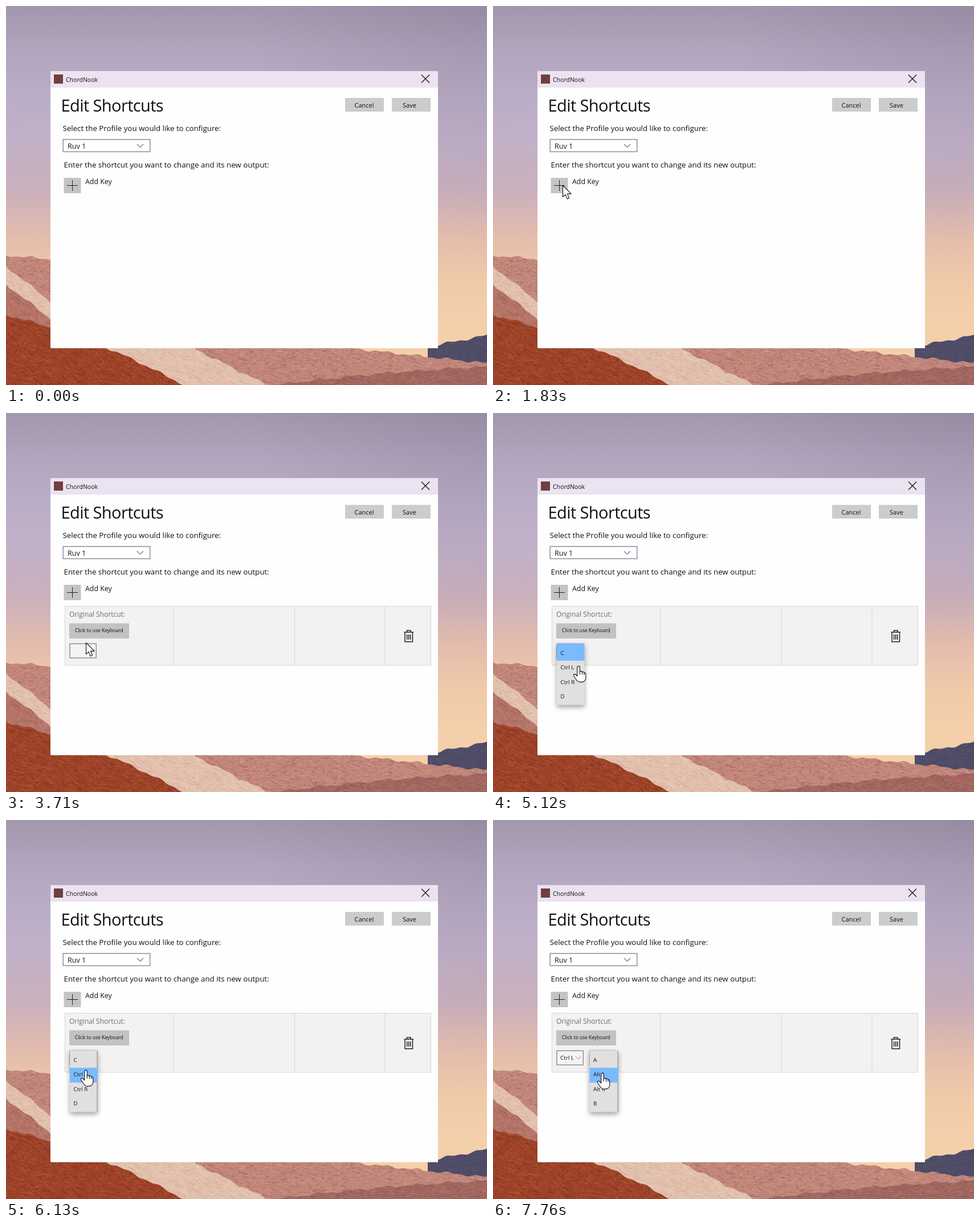
Recreate the animation shown at these times as an HTML page with a canvas. Size 844 px wide and 664 px high, loop 7.99 s.

```html
<!DOCTYPE html>
<html lang="en">
<head>
<meta charset="utf-8">
<title>Edit Shortcuts</title>
<style>
  html, body { margin: 0; width: 100%; height: 100%; overflow: hidden; background: #b8a9bf; }
  canvas, svg { position: absolute; left: 0; top: 0; width: 844px; height: 664px; }
  text { font-family: "Open Sans", "Noto Sans", sans-serif; fill: #111; }
  .h { font-size: 29px; letter-spacing: -.6px; }
  .p { font-size: 13.3px; }
  .b { font-size: 11px; }
  .k { font-size: 9.8px; }
  .line { fill: none; stroke: #222; }
  .box { fill: #f5f3f4; stroke: #8c8c8c; stroke-width: 1.4; }
  .chev { fill: none; stroke: #8a8a8a; }
  .cell { stroke: #d6d5d6; fill: none; }
  .list { filter: drop-shadow(0 4px 4px rgba(0, 0, 0, .36)); }
  .ptr { fill: #fff; stroke: #111; stroke-width: 1.1; stroke-linejoin: round; }
</style>
</head>
<body>
<canvas id="land" width="844" height="664"></canvas>
<svg viewBox="0 0 844 664">
  <rect x="78" y="114" width="680" height="485.500" fill="#fefefe"/>
  <rect x="78" y="114" width="680" height="29" fill="#ebe3f1"/>
  <rect x="84" y="120" width="16" height="16" fill="#70403f"/>
  <text x="105" y="132.500" font-size="10.5">ChordNook</text>
  <path class="line" stroke-width="1.5" d="M729 120.500l14 14m0 -14l-14 14"/>

  <text class="h" x="96.500" y="184.500">Edit Shortcuts</text>
  <path fill="#ccc" d="M595 161h68v24h-68zM677 161h68v24h-68z"/>
  <text class="b" x="611.500" y="177.500">Cancel</text>
  <text class="b" x="696" y="177.500">Save</text>

  <text class="p" x="99.500" y="219">Select the Profile you would like to configure:</text>
  <rect x="100.200" y="233.800" width="152.500" height="21.500" fill="#fff" stroke="#9792a5" stroke-width="1.6"/>
  <text x="108" y="249.500" font-size="12.6">Ruv 1</text>
  <path class="line" d="M230 242l5.500 5.500l5.500 -5.500"/>

  <text class="p" x="101.500" y="283">Enter the shortcut you want to change and its new output:</text>
  <rect x="101.500" y="301" width="30" height="27" fill="#c4c4c4"/>
  <path class="line" d="M107 314.500h19m-9.500 -9.500v19"/>
  <text x="139" y="311.500" font-size="12.4">Add Key</text>

  <g id="row">
    <rect x="103.500" y="338.500" width="642" height="103.500" fill="#f3f1f2"/>
    <path class="cell" d="M103.500 338.500h642v103.500h-642zM294 338.500v103.500M506.500 338.500v103.500M665 338.500v103.500"/>
    <text x="111" y="357" font-size="12" style="fill:#6c6c6c">Original Shortcut:</text>
    <rect x="111" y="368.500" width="105" height="26.500" fill="#c2c2c2"/>
    <text x="121" y="384" font-size="8.5">Click to use Keyboard</text>
    <path class="line" stroke-width="1.5" d="M698.500 384h16.500m-11.500 -.5v-2.500h6.500v2.500M700 384.500v16.200h13.500v-16.200M703.700 388v9m3 0v-9m3 0v9"/>
    <rect class="box" x="112" y="404.300" width="46.300" height="24.800"/>
    <path class="chev" d="M145 414l4.700 4.700l4.700 -4.700"/>
    <text class="k" id="value" x="118" y="419.500">Ctrl L</text>
  </g>
  <g id="second">
    <rect class="box" x="169.700" y="404.300" width="46" height="24.800"/>
    <path class="chev" d="M202 414l4.700 4.700l4.700 -4.700"/>
  </g>
  <g id="ctrl" class="list"></g>
  <g id="alt" class="list"></g>

  <g id="pointer">
    <path id="arrow" class="ptr" d="M.5 .5V20.500L5 16.400L8.300 24L11.600 22.500L8.400 15.100H15.200Z"/>
    <g id="hand" class="ptr">
      <path d="M-2.300 2.500C-2.300 -.4 2.300 -.4 2.300 2.500V10.500C3 8.700 6.500 9 6.500 11.500C7.300 9.600 10 10.200 10 12.600C11 11.300 12.800 12.200 12.800 14.500V20C12.800 25 10 28.400 5.500 28.400H2.500C-.5 28.400 -2 27 -4 24L-8.300 17.700C-9.600 15.200 -7 13.300 -5 15.200L-2.300 18Z"/>
      <path fill="none" d="M2.300 10.500V15M6.500 11.500V15.500M10 12.600V16"/>
    </g>
  </g>
</svg>
<script>
const $ = id => document.getElementById(id);
const W = 844, H = 664, LOOP = 7990;

// Landscape
const ctx = $('land').getContext('2d');
let seed = 11;
const rand = () => (seed = (seed * 16807) % 2147483647) / 2147483647;

function sky() {
  const g = ctx.createLinearGradient(0, 0, 0, 560);
  ['#a297ad', '#b2a5bd', '#bbadc6', '#c2b1c8', '#c9b0bd', '#e2bbad', '#efcaa9', '#f3d0aa']
    .forEach((c, i, all) => g.addColorStop(i / (all.length - 1), c));
  ctx.fillStyle = g;
  ctx.fillRect(0, 0, W, H);
  const shade = ctx.createRadialGradient(W, 0, 0, W, 0, 420);
  shade.addColorStop(0, 'rgba(90, 80, 105, .16)');
  shade.addColorStop(1, 'rgba(90, 80, 105, 0)');
  ctx.fillStyle = shade;
  ctx.fillRect(0, 0, W, H);
}

// Ground below a wavy ridge, covered with tufts that run down the slope.
function hill(from, to, bow, fill, tones, density) {
  const [x0, y0] = from, [x1, y1] = to;
  const w = x1 - x0, pitch = (y1 - y0) / w;
  const ridge = x => {
    const p = (x - x0) / w;
    return y0 + p * (y1 - y0) - bow * Math.sin(Math.PI * p) + 1.5 * Math.sin(x / 9) + Math.sin(x / 4);
  };
  ctx.save();
  ctx.beginPath();
  ctx.moveTo(x0, H);
  for (let x = x0; x <= x1; x += 2) ctx.lineTo(x, ridge(x));
  ctx.lineTo(x1, H);
  ctx.fillStyle = fill;
  ctx.fill();
  ctx.clip();
  const top = Math.min(y0, y1) - bow;
  for (let n = w * (H - top) * density; n > 0; n--) {
    const x = x0 + rand() * w, y = top + rand() * (H - top);
    const len = 2 + 9 * rand() ** 3;
    ctx.strokeStyle = tones[Math.floor(rand() * tones.length)];
    ctx.globalAlpha = .2 + rand() * .4;
    ctx.beginPath();
    ctx.moveTo(x, y);
    ctx.lineTo(x + len, y + len * (pitch + rand() - .5));
    ctx.stroke();
  }
  ctx.restore();
}

const rose = ['#c2877b', ['#a1625b', '#dcaa9c', '#d29582', '#8b5656'], .13];
const cream = ['#e0bfac', ['#f1dac9', '#c9988a', '#edcfbb'], .12];

sky();
hill([740, 597], [W, 577], 0, '#4f4c67', ['#403f5a', '#66607a'], .06);
hill([380, 575], [W, 626], 0, ...rose);
hill([470, H], [W, 632], 4, '#a0665f', ['#84504f', '#c08779'], .12);
hill([0, 437], [400, 470], 0, ...rose);
hill([150, 510], [458, H], 0, ...cream);
hill([0, 456], [200, 614], 0, ...cream);
hill([0, 488], [120, 580], 0, '#b47467', ['#8f5149', '#d09483'], .13);
hill([0, 541], [312, H], 12, '#9b4229', ['#c3623f', '#732a1a', '#b04f2f'], .2);

// Open drop-down lists
function makeList(id, x, w, items) {
  $(id).innerHTML =
    `<rect x="${x}" y="404" width="${w}" height="107.500" fill="#e2e0de"/>
     <rect class="edge" x="${x + w - 1}" y="404" width="1" height="107.500" fill="#858585"/>
     <rect class="mark" x="${x}" width="${w}" fill="#7abaff"/>` +
    items.map((s, i) => `<text class="k" x="${x + 6.5}" y="${423.5 + 25.5 * i}">${s}</text>`).join('');
}
makeList('ctrl', 112, 48.5, ['C', 'Ctrl L', 'Ctrl R', 'D']);
makeList('alt', 169.5, 50, ['A', 'Alt L', 'Alt R', 'B']);

function mark(id, second) {
  const m = $(id).querySelector('.mark');
  m.setAttribute('y', second ? 434 : 404);
  m.setAttribute('height', second ? 26 : 30);
  $(id).querySelector('.edge').style.opacity = second ? 1 : 0;
}

// Pointer moves: start, end, x, y and how far the path sags midway
const moves = [
  [570, 570, 320, 251],
  [730, 1590, 105, 297, 45],
  [1610, 1830, 122, 314],
  [2300, 3150, 227, 354],
  [3150, 3710, 140, 402],
  [3770, 3940, 175, 426],
  [4250, 4650, 150, 423],
  [5050, 5120, 150, 443],
  [5200, 5740, 145, 452, 10],
  [5900, 6130, 140, 438],
  [6680, 7070, 187, 413],
  [7150, 7220, 184, 430],
  [7300, 7760, 192, 443]
];
const ease = p => p * p * (3 - 2 * p);

function locate(t) {
  let x = 350, y = 331;
  for (const [start, end, toX, toY, sag = 0] of moves) {
    if (t < start) break;
    const p = t >= end ? 1 : ease((t - start) / (end - start));
    x += (toX - x) * p;
    y += (toY - y) * p + sag * 4 * p * (1 - p);
  }
  return [x, y];
}

const show = (id, on) => { $(id).style.display = on ? '' : 'none'; };

function draw(t) {
  show('pointer', t >= 500);
  show('row', t >= 1910);
  show('arrow', t < 4320);
  show('hand', t >= 4320);
  show('ctrl', t >= 4880 && t < 6450);
  show('value', t >= 6450);
  show('second', t >= 6520);
  show('alt', t >= 7300);
  mark('ctrl', t >= 6050);
  mark('alt', t >= 7550);
  $('pointer').setAttribute('transform', `translate(${locate(t)})`);
}

const begin = performance.now();
function tick() {
  draw((performance.now() - begin) % LOOP);
  requestAnimationFrame(tick);
}
tick();
</script>
</body>
</html>
```
